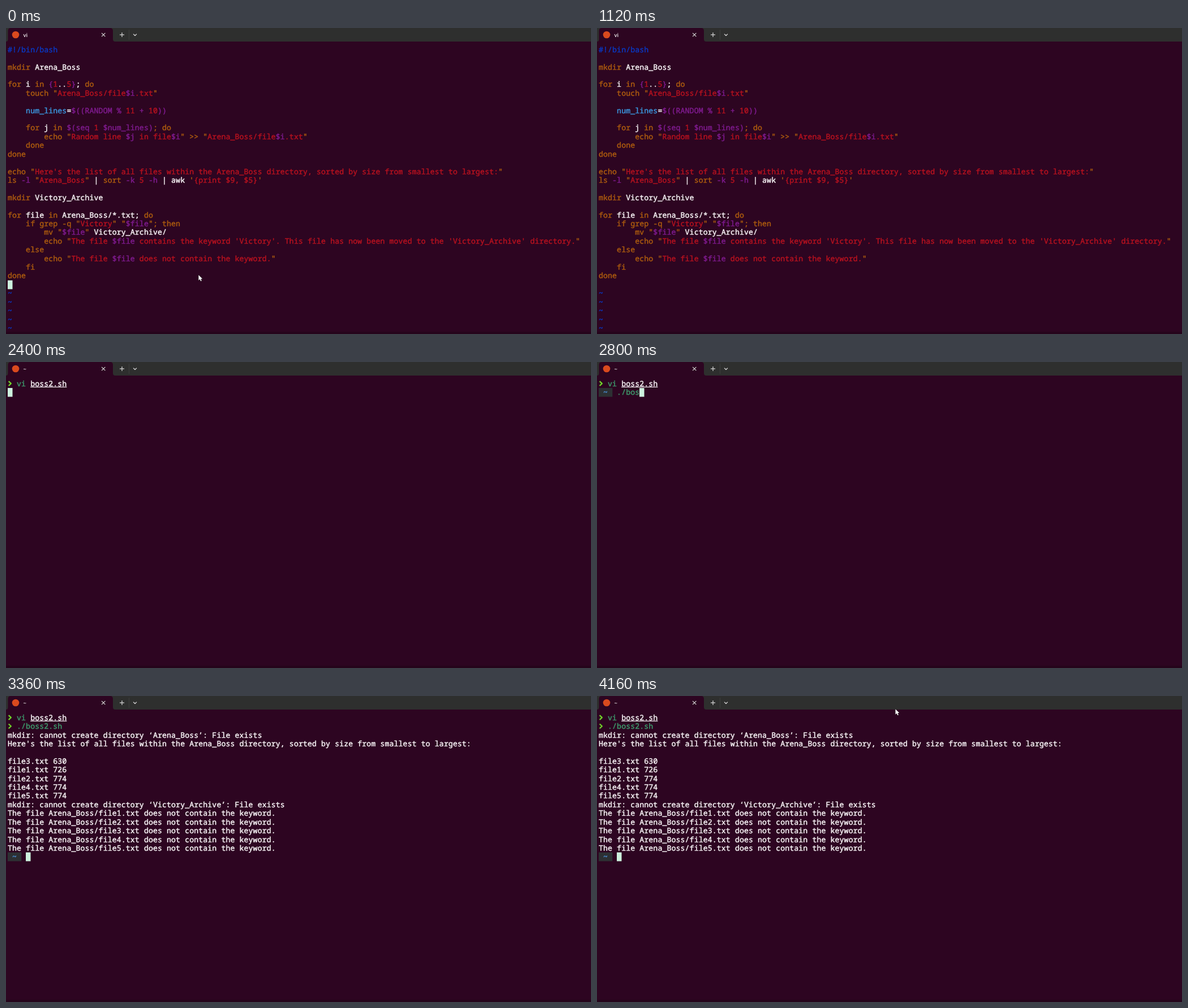
An HTML page with a canvas for the animation above (4.24 s loop, 1034 by 542 pixels).

```html
<!DOCTYPE html>
<html lang="en">
<head>
<meta charset="utf-8">
<title>Terminal session</title>
<style>
  html, body { margin: 0; width: 100%; height: 100%; overflow: hidden; background: #2d0521; }
  canvas { display: block; }
</style>
</head>
<body>
<canvas id="stage" width="1034" height="542"></canvas>
<script>
const ctx = document.getElementById('stage').getContext('2d');
const LOOP = 4240, STEP = 80;
const LEFT = 3, TOP = 30.5, CELL = 8.03, ROW = 15.41;
const MONO = '500 13.2px "Noto Sans Mono", "DejaVu Sans Mono", monospace';
const BG = '#2d0521', BAR = '#2e2f2e', CURSOR = '#cdf2de';

// Colour codes used in the marked-up lines: ^x switches to colour x.
const INK = {
  w: '#f4f0f2', o: '#a9590f', r: '#b3111f', p: '#7d1a8c',
  b: '#0b36bd', c: '#3a92d8', g: '#3d976a', u: '#4b8ed6'
};

const script = String.raw`^b#!/bin/bash

^omkdir ^wArena_Boss

^ofor ^wi ^oin ^p{^r1^w..^r5^p}^w; ^odo
^o    touch "^rArena_Boss/file^p$i^r.txt^o"

^c    num_lines^w=^p$((RANDOM % ^r11 ^p+ ^r10^p))

^o    for ^wj ^oin ^p$(seq ^r1 ^p$num_lines)^o; do
^o        echo "^rRandom line ^p$j^r in file^p$i^o" >> "^rArena_Boss/file^p$i^r.txt^o"
^o    done
^odone

^oecho "^rHere's the list of all files within the Arena_Boss directory, sorted by size from smallest to largest:^o"
^ols ^p-l ^o"^rArena_Boss^o" ^w| ^osort ^p-k ^r5 ^p-h ^w| awk ^o'^r{print $9, $5}^o'

^omkdir ^wVictory_Archive

^ofor ^wfile ^oin ^wArena_Boss/*.txt; ^odo
^o    if grep -q "^rVictory^o" "^p$file^o"; then
^o        mv "^p$file^o" ^wVictory_Archive/
^o        echo "^rThe file ^p$file^r contains the keyword 'Victory'. This file has now been moved to the 'Victory_Archive' directory.^o"
^o    else
^o        echo "^rThe file ^p$file^r does not contain the keyword.^o"
^o    fi
^odone`.split('\n');

const sizes = [[3, 630], [1, 726], [2, 774], [4, 774], [5, 774]];
const output = [
  'mkdir: cannot create directory ‘Arena_Boss’: File exists',
  "Here's the list of all files within the Arena_Boss directory, sorted by size from smallest to largest:",
  '',
  ...sizes.map(([n, size]) => `file${n}.txt ${size}`),
  'mkdir: cannot create directory ‘Victory_Archive’: File exists',
  ...[1, 2, 3, 4, 5].map(n => `The file Arena_Boss/file${n}.txt does not contain the keyword.`)
];

const COMMAND = './boss2.sh';
const typing = [[2720, 2], [2800, 5], [2880, 7], [2960, 9], [3120, 10]];

const cellX = col => LEFT + col * CELL;
const rowY = row => TOP + row * ROW;

function box(x, y, w, h, color) {
  ctx.fillStyle = color;
  ctx.fillRect(x, y, w, h);
}

function trace(points, color, width) {
  ctx.beginPath();
  points.forEach(([x, y]) => ctx.lineTo(x, y));
  ctx.strokeStyle = color;
  ctx.lineWidth = width;
  ctx.stroke();
}

// Terminal text: one glyph per cell, thickened by a fine outline.
function write(row, col, text) {
  const y = rowY(row) + 12.3;
  let color = INK.w;
  ctx.font = MONO;
  ctx.lineWidth = 0.5;
  ctx.lineJoin = 'round';
  for (let i = 0; i < text.length; i++) {
    if (text[i] === '^') {
      color = INK[text[++i]];
      continue;
    }
    if (text[i] !== ' ') {
      ctx.fillStyle = ctx.strokeStyle = color;
      ctx.fillText(text[i], cellX(col), y);
      ctx.strokeText(text[i], cellX(col), y);
    }
    col++;
  }
}

function cursor(row, col) {
  box(Math.round(cellX(col)), Math.round(rowY(row)), 8.5, 15.6, CURSOR);
}

function tabBar(title) {
  box(0, 0, 1034, 24, BAR);
  ctx.fillStyle = BG;
  ctx.beginPath();
  ctx.moveTo(0, 24);
  ctx.quadraticCurveTo(3.5, 24, 3.5, 20);
  ctx.lineTo(3.5, 5);
  ctx.quadraticCurveTo(3.5, 0, 8.5, 0);
  ctx.lineTo(184, 0);
  ctx.quadraticCurveTo(189, 0, 189, 5);
  ctx.lineTo(189, 20);
  ctx.quadraticCurveTo(189, 24, 193, 24);
  ctx.fill();

  ctx.fillStyle = '#d94a1e';
  ctx.beginPath();
  ctx.arc(17, 12, 6.3, 0, Math.PI * 2);
  ctx.fill();

  ctx.font = '600 9.5px "Open Sans", "Noto Sans", sans-serif';
  ctx.fillStyle = '#f0ecee';
  ctx.fillText(title, 30.5, 15.5);

  const line = '#dcdcdc';
  trace([[169, 8.8], [175.4, 15.2]], line, 1.1);
  trace([[175.4, 8.8], [169, 15.2]], line, 1.1);
  trace([[201, 12], [209, 12]], line, 1.2);
  trace([[205, 8], [205, 16]], line, 1.2);
  trace([[217.5, 3], [217.5, 21]], '#3d3e3d', 1);
  trace([[225, 10.6], [228, 13.5], [231, 10.6]], line, 1.2);
}

function pointer(x, y) {
  const shape = [[0, 0], [0, 9.6], [2.2, 7.6], [3.8, 11], [5.4, 10.3], [3.9, 7], [6.8, 6.8]];
  ctx.beginPath();
  shape.forEach(([dx, dy]) => ctx.lineTo(x + dx, y + dy));
  ctx.closePath();
  ctx.strokeStyle = '#140510';
  ctx.lineWidth = 1;
  ctx.stroke();
  ctx.fillStyle = '#fff';
  ctx.fill();
}

function glide(t, start, end, from, to) {
  const k = Math.min(1, Math.max(0, (t - start) / (end - start)));
  const e = k * k * (3 - 2 * k);
  pointer(from[0] + (to[0] - from[0]) * e, from[1] + (to[1] - from[1]) * e);
}

function chevron(row) {
  const y = rowY(row) + 7.6;
  trace([[4.6, y - 4], [8.9, y], [4.6, y + 4]], '#70d329', 2.2);
}

function livePrompt(row) {
  box(3, Math.round(rowY(row)), 24.3, 15.6, '#2d3033');
  write(row, 1, '^u~');
}

function editor(t) {
  tabBar('vi');
  script.forEach((line, row) => write(row, 0, line));
  for (let row = 28; row < 33; row++) write(row, 0, '^b~');
  if (t < 800) cursor(27, 0);
  if (t < 1040) glide(t, 0, 560, [340.4, 437.4], [346.4, 346]);
}

function shell(t) {
  tabBar('~');
  chevron(0);
  write(0, 2, '^gvi ^wboss2.sh');
  box(cellX(5), 43.8, 8 * CELL, 1.2, INK.w);

  if (t < 2480) {
    cursor(1, 0);
  } else if (t < 3360) {
    const count = typing.reduce((n, [at, chars]) => t >= at ? chars : n, 0);
    livePrompt(1);
    write(1, 4, '^g' + COMMAND.slice(0, count));
    cursor(1, 4 + count);
  } else {
    chevron(1);
    write(1, 2, '^g' + COMMAND);
    output.forEach((line, i) => write(i + 2, 0, line));
    livePrompt(16);
    cursor(16, 4);
    if (t >= 3680) glide(t, 3680, 4160, [554, 280], [527.5, 23.2]);
  }
}

function draw() {
  const t = Math.floor(performance.now() % LOOP / STEP) * STEP;
  ctx.textRendering = 'geometricPrecision';
  box(0, 0, 1034, 542, BG);
  box(0, 538, 1034, 4, '#25041b');
  (t < 2400 ? editor : shell)(t);
  requestAnimationFrame(draw);
}
draw();
</script>
</body>
</html>
```
